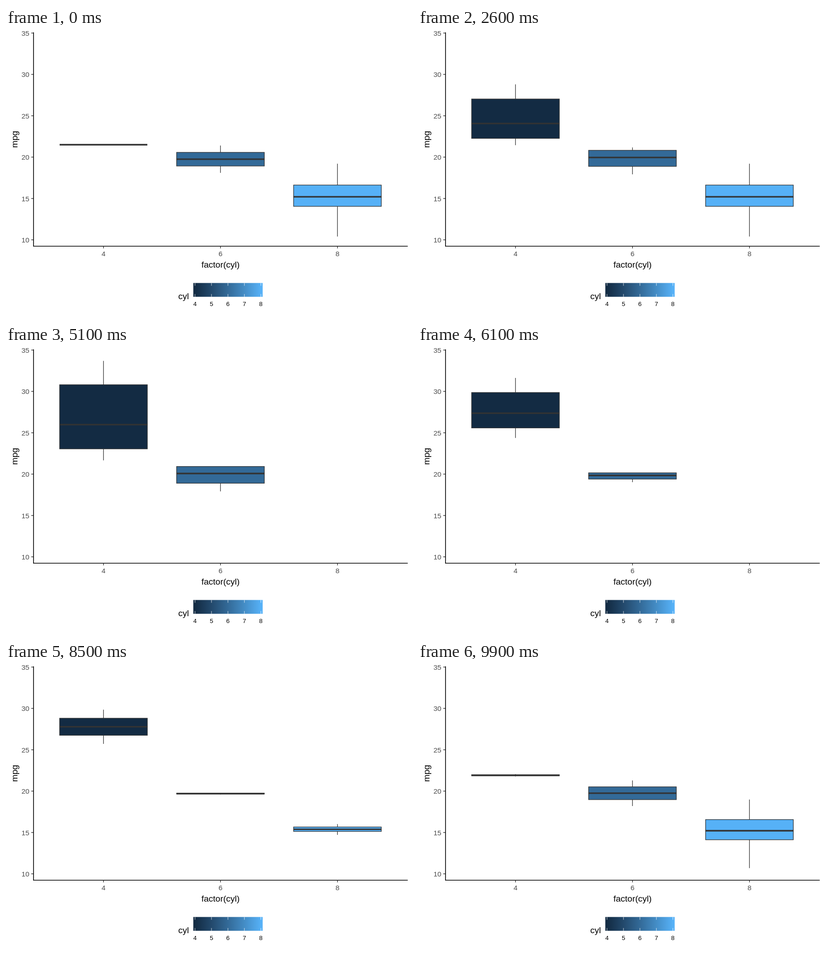
An HTML page that plays this animation: 885 px wide and 632 px high, repeating every 10000 ms.

```html
<!DOCTYPE html>
<html lang="en">
<head>
<meta charset="utf-8">
<title>Box plots by cylinder count</title>
<style>
  html, body { margin: 0; width: 100%; height: 100%; overflow: hidden; background: #fff; }
  svg { display: block; width: 885px; height: 632px; font-family: "Liberation Sans", Arial, sans-serif; }
  .axis { stroke: #000; stroke-width: 1.6; fill: none; }
  .tick { stroke: #333; stroke-width: 1.4; }
  .box { stroke: #333; stroke-width: 1.3; }
  .median { stroke: #333; stroke-width: 3.3; }
  .label { font-size: 15.5px; fill: #4d4d4d; }
  .title { font-size: 19px; }
  .key { font-size: 13.4px; }
  .mark { stroke: #fff; stroke-width: 0.8; }
</style>
</head>
<body>
<svg id="plot" viewBox="0 0 885 632">
  <defs>
    <linearGradient id="ramp" gradientUnits="userSpaceOnUse" x1="412" x2="556">
      <stop offset="0" stop-color="#132b43"/>
      <stop offset=".25" stop-color="#23496c"/>
      <stop offset=".5" stop-color="#336a98"/>
      <stop offset=".75" stop-color="#448dc6"/>
      <stop offset="1" stop-color="#56b1f7"/>
    </linearGradient>
  </defs>
</svg>
<script>
const plot = document.getElementById("plot");
const CENTERS = [212.5, 467.5, 722.5];
const FILLS = ["#132b43", "#336a98", "#56b1f7"];
const HALF = 95.6;
const STEP = 100, STEPS = 100;

// Per state, per group: min, lower quartile, median, upper quartile, max
const STATES = [
  [[21.5, 21.5, 21.5, 21.5, 21.5], [18.1, 18.925, 19.75, 20.575, 21.4], [10.4, 14.05, 15.2, 16.625, 19.2]],
  [[21.4, 22.8, 25.85, 30.9, 33.9], [17.8, 18.85, 20.1, 21, 21], null],
  [[26, 27.1, 28.2, 29.3, 30.4], [19.7, 19.7, 19.7, 19.7, 19.7], [15, 15.2, 15.4, 15.6, 15.8]]
];
// Last resting step of each state, first step of the next
const MOVES = [[16, 33], [50, 67], [84, 100]];

const yOf = v => 477.3 - (v - 9.225) * 18.09;

function set(node, attrs) {
  for (const name in attrs) node.setAttribute(name, attrs[name]);
}

function add(tag, attrs, text, parent = plot) {
  const node = document.createElementNS("http://www.w3.org/2000/svg", tag);
  set(node, attrs);
  if (text !== undefined) node.textContent = text;
  return parent.appendChild(node);
}

const line = (cls, x1, y1, x2, y2) => add("line", { class: cls, x1, y1, x2, y2 });
const label = (cls, x, y, text, anchor = "middle") =>
  add("text", { class: cls, x, y, "text-anchor": anchor }, text);

function drawFrame() {
  for (let v = 10; v <= 35; v += 5) {
    line("tick", 55, yOf(v), 60, yOf(v));
    label("label", 51, yOf(v) + 6, v, "end");
  }
  CENTERS.forEach((x, i) => {
    line("tick", x, 477, x, 482);
    label("label", x, 498.5, 4 + 2 * i);
  });
  add("path", { class: "axis", d: "M60 9.5V477.3H875.7" });
  label("title", 467.7, 524, "factor(cyl)");
  add("text", { class: "title", "text-anchor": "middle", transform: "translate(25 243.4) rotate(-90)" }, "mpg");

  label("title", 375.5, 592.5, "cyl", "start");
  add("rect", { x: 408.3, y: 557.6, width: 151.2, height: 30.2, fill: "url(#ramp)" });
  for (let i = 0; i < 5; i++) {
    const x = 412 + 35.9 * i;
    line("mark", x, 557.6, x, 563.6);
    line("mark", x, 581.8, x, 587.8);
    label("key", x, 608.3, 4 + i);
  }
}

function makeBox(x, fill) {
  const group = add("g", {});
  const part = (tag, attrs) => add(tag, attrs, undefined, group);
  const whiskers = part("path", { class: "box" });
  const body = part("rect", { class: "box", x: x - HALF, width: 2 * HALF, fill });
  const median = part("line", { class: "median", x1: x - HALF, x2: x + HALF });
  return stats => {
    group.style.display = stats ? "" : "none";
    if (!stats) return;
    const [min, low, mid, high, max] = stats.map(yOf);
    set(whiskers, { d: `M${x} ${max}V${high}M${x} ${low}V${min}` });
    set(body, { y: high, height: low - high });
    set(median, { y1: mid, y2: mid });
  };
}

// A group missing from one state appears or vanishes only when the move ends.
function blend(from, to, t) {
  if (t >= 1) return to;
  if (!from || !to) return from;
  return from.map((v, i) => v + (to[i] - v) * t);
}

drawFrame();
const boxes = CENTERS.map((x, i) => makeBox(x, FILLS[i]));

function render() {
  const step = Math.floor(performance.now() / STEP) % STEPS;
  const s = MOVES.findIndex(([, end]) => step < end);
  const [start, end] = MOVES[s];
  const t = Math.max(0, (step - start) / (end - start));
  const next = STATES[(s + 1) % STATES.length];
  boxes.forEach((draw, i) => draw(blend(STATES[s][i], next[i], t)));
  requestAnimationFrame(render);
}
render();
</script>
</body>
</html>
```
